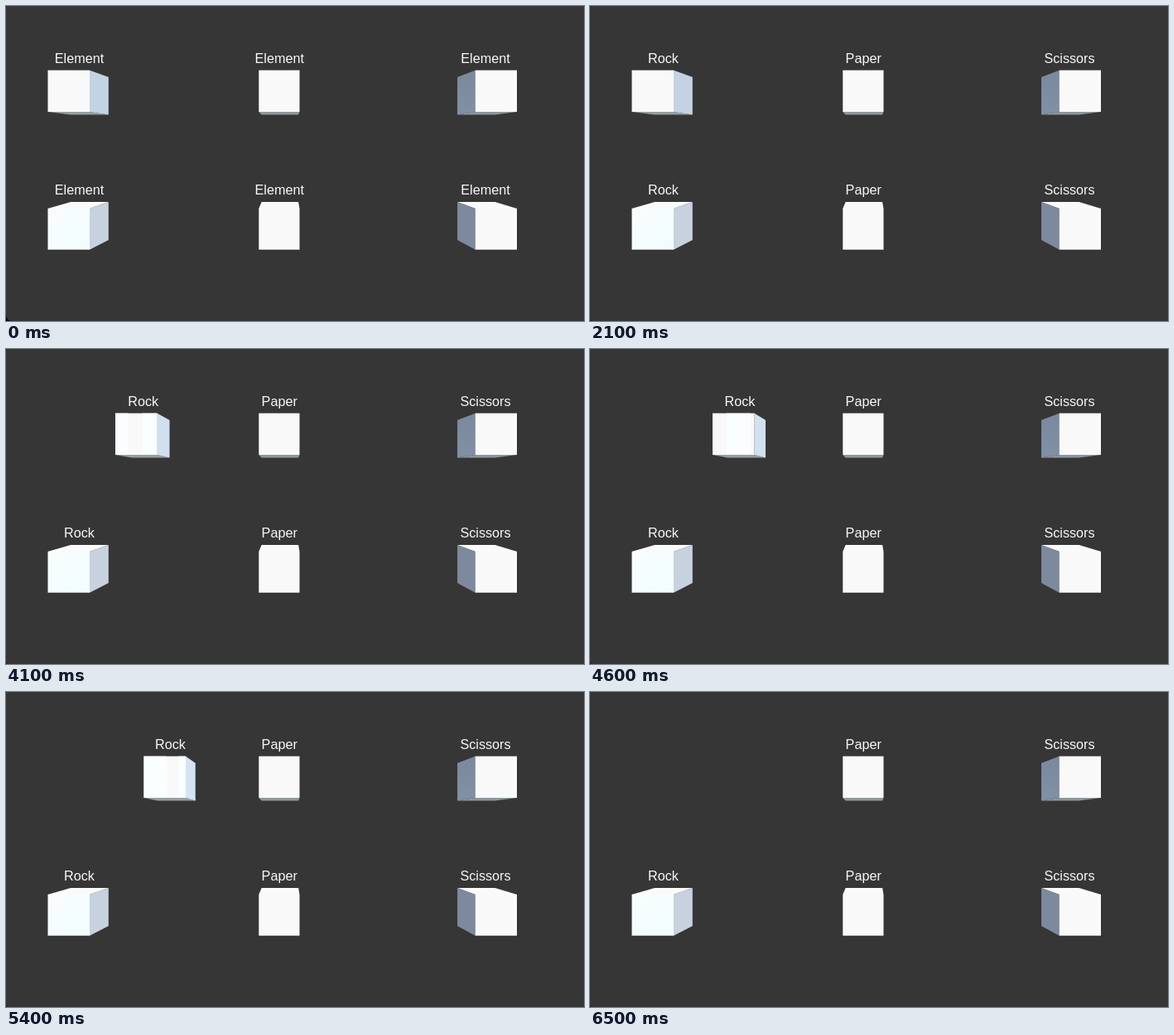
An HTML page with a canvas for the animation above (8 s loop, 698x381 px).

```html
<!DOCTYPE html>
<html>
<head>
<meta charset="utf-8">
<style>
html, body { margin: 0; width: 100%; height: 100%; overflow: hidden; background: #363636; }
canvas { display: block; }
</style>
</head>
<body>
<canvas id="stage" width="698" height="381"></canvas>
<script>
const ctx = document.getElementById('stage').getContext('2d');
const LOOP = 8000, STEP = 100;
const NAMED = 2100, DRAG = 3800, GONE = 6500;
const HOME = 50.5;

// left edge of the dragged cube at each step after DRAG
const path = [62.5, 83, 107, 132, 153, 163, 163, 157, 148, 140.5, 138, 142, 149, 157,
  164, 167.5, 166.5, 162.5, 159, 158, 161, 167.5, 175.5, 188, 203, 220, 241];

// perspective: the back plane shrinks toward the vanishing column
const back = x => x + (340 - x) * 0.0955;

function poly(fill, ...p) {
  ctx.fillStyle = fill;
  ctx.beginPath();
  for (let i = 0; i < p.length; i += 2) ctx.lineTo(p[i], p[i + 1]);
  ctx.fill();
}

function blend(from, to, y0, y1, x0 = 0, x1 = 0) {
  const g = ctx.createLinearGradient(x0, y0, x1, y1);
  g.addColorStop(0, from);
  g.addColorStop(1, to);
  return g;
}

function label(text, x, y) {
  ctx.fillStyle = '#f8f8f8';
  ctx.fillText(text, x, y);
}

// lower = seen from above, otherwise seen from below
function cube(x, w, lower, front, side, cap) {
  const r = x + w, bl = back(x), br = back(r);
  const [top, bottom, backTop, backBottom] =
    lower ? [245, 294.7, 237, 283] : [77.7, 128, 86, 131.4];
  if (lower) poly(cap, x, top, bl, backTop, br, backTop, r, top);
  else poly(cap, x, bottom, bl, backBottom, br, backBottom, r, bottom);
  if (br > r) poly(side, r, top, br, backTop, br, backBottom, r, bottom);
  if (bl < x) poly(side, x, top, bl, backTop, bl, backBottom, x, bottom);
  ctx.fillStyle = front;
  ctx.fillRect(x, top, w, bottom - top);
}

// cool sheen bands stay fixed on screen while the cube passes them
function sheen(x, w) {
  ctx.fillStyle = '#fafeff';
  for (const [a, b] of [[102, 148], [165, 194], [208, 300]]) {
    const l = Math.max(a, x), r = Math.min(b, x + w);
    if (r > l) ctx.fillRect(l, 77.7, r - l, 50.3);
  }
}

function corner(size, color) {
  ctx.fillStyle = color;
  ctx.beginPath();
  ctx.moveTo(0, 381 - size);
  ctx.quadraticCurveTo(0, 381, size, 381);
  ctx.lineTo(0, 381);
  ctx.fill();
}

function draw(t) {
  ctx.fillStyle = '#363636';
  ctx.fillRect(0, 0, 698, 381);
  if (t < 700) corner(8, '#050505');
  else corner(4, '#202020');

  const names = t < NAMED ? Array(3).fill('Element') : ['Rock', 'Paper', 'Scissors'];
  const white = '#f9f9f9';
  ctx.font = '16.2px "Liberation Sans", Arial, sans-serif';
  ctx.textAlign = 'center';

  if (t < GONE) {
    const x = t < DRAG ? HOME : path[Math.floor((t - DRAG) / STEP)];
    const d = x - HOME, lift = d * 0.145;
    cube(x, 50.5, false, white, `rgb(${196 + lift},${211 + lift},${227 + lift})`, '#969fa2');
    sheen(x, 50.5);
    label(names[0], 88.5 + d * 0.948, 69);
  }
  cube(305.3, 49.2, false, white, '#c4d3e3', '#8f999c');
  cube(566.7, 50.3, false, white, blend('#7b899f', '#8290a5', 80, 131), '#8b979c');

  cube(HOME, 50.5, true, blend('#f9fcfd', '#f3fdff', 245, 285, 50, 80), '#c8d2de', '#fbfafa');
  cube(305.3, 49.2, true, white, '#c8d2de', '#fafafa');
  cube(566.7, 50.3, true, white, '#7d899d', '#fafafa');

  label(names[0], 88.5, 228);
  for (const y of [69, 228]) {
    label(names[1], 330.2, y);
    label(names[2], 579, y);
  }
}

const start = performance.now();
function tick() {
  draw((performance.now() - start) % LOOP);
  requestAnimationFrame(tick);
}
tick();
</script>
</body>
</html>
```
